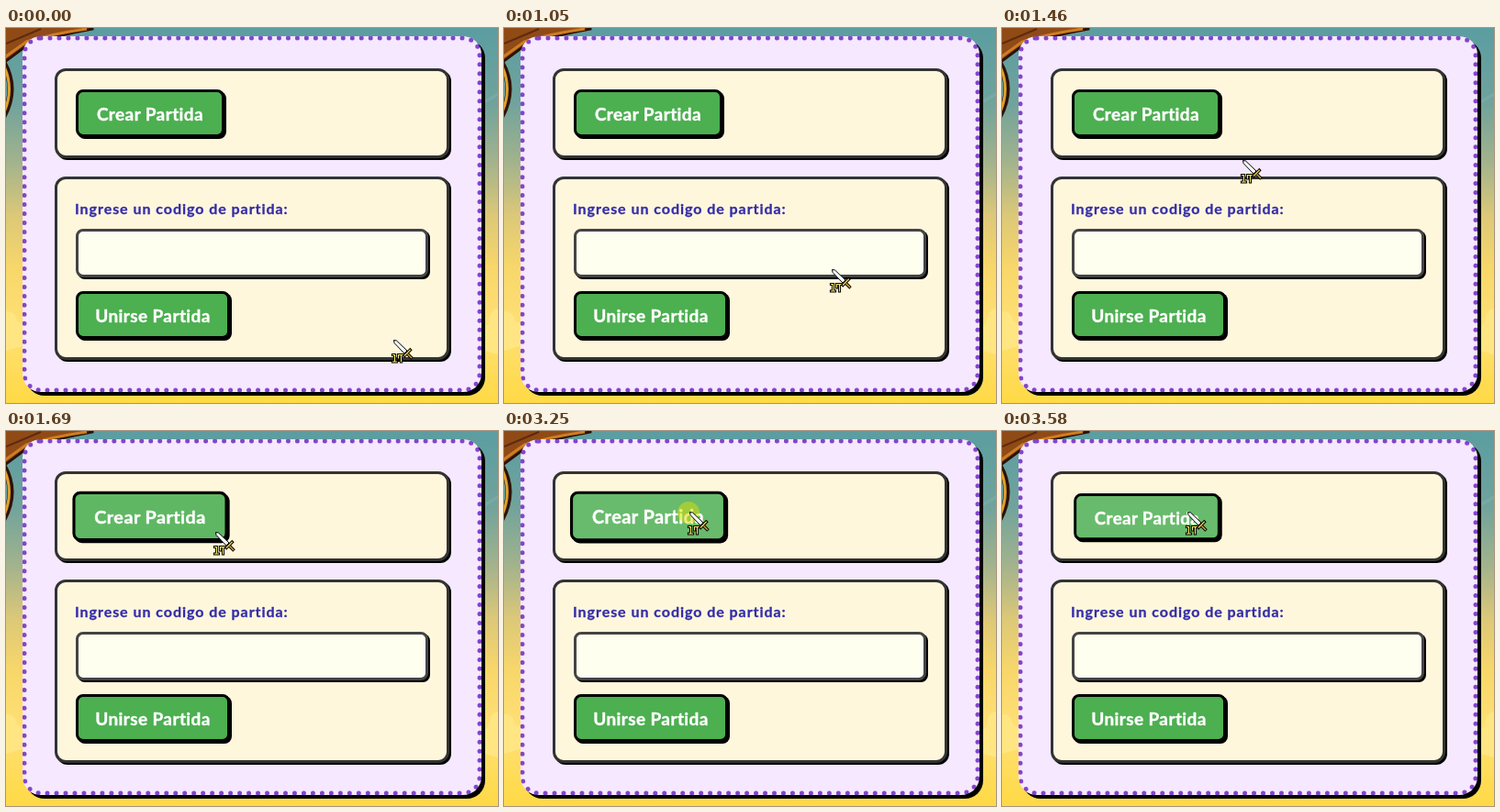
Recreate the animation shown at these times as an HTML page. Size 536 px wide and 409 px high, loop 3610 ms.

```html
<!DOCTYPE html>
<html lang="es">
<head>
<meta charset="utf-8">
<title>Partida</title>
<style>
  html, body { margin: 0; width: 100%; height: 100%; overflow: hidden; }
  body { position: relative; font-family: Lato, "Open Sans", sans-serif; font-weight: 700; }
  body > * { position: absolute; box-sizing: border-box; }
  #sky { left: 0; top: 0; }
  .panel {
    left: 18px; top: 9px; width: 500px; height: 388px;
    background: #f5e8ff; border: 5px dotted #8445cc; border-radius: 20px;
    box-shadow: 4px 4px 0 #000;
  }
  .card {
    left: 53px; width: 430px;
    background: #fff7dc; border: 3px solid #333; border-radius: 12px;
    box-shadow: 2px 2px 0 #000;
  }
  .field {
    left: 76px; top: 219px; width: 384px; height: 53px;
    background: #fffff0; border: 3px solid #444; border-radius: 8px;
    box-shadow: 2px 2px 0 #000;
  }
  .label {
    left: 75px; top: 187px; line-height: 20px; white-space: nowrap;
    font-size: 16px; letter-spacing: .95px; color: #332ca8;
    -webkit-text-stroke: .3px #332ca8;
  }
  .button {
    left: 76px; height: 52px; padding: 0;
    display: flex; align-items: center; justify-content: center; white-space: nowrap;
    font-size: 19px; letter-spacing: .4px; color: #fff;
    -webkit-text-stroke: .4px #fff;
    background: #4caf50; border: 3px solid #000; border-radius: 8px;
    box-shadow: 2px 2px 0 #000;
  }
  #halo {
    left: 189px; top: 77px; width: 24px; height: 24px;
    border-radius: 50%; background: rgba(216, 220, 10, .52);
  }
  #cursor { left: 0; top: 0; width: 30px; height: 32px; overflow: visible; }
</style>
</head>
<body>
<svg id="sky" width="536" height="409" viewBox="0 0 536 409">
  <defs>
    <linearGradient id="dusk" x1="0" y1="0" x2="0" y2="1">
      <stop offset="0" stop-color="#5b9da1"/>
      <stop offset=".2" stop-color="#70a39c"/>
      <stop offset=".36" stop-color="#a3b38c"/>
      <stop offset=".5" stop-color="#dcc878"/>
      <stop offset=".64" stop-color="#f8d76a"/>
      <stop offset=".8" stop-color="#ffe075"/>
      <stop offset="1" stop-color="#ffd945"/>
    </linearGradient>
  </defs>
  <rect width="536" height="409" fill="url(#dusk)"/>
  <path d="M516 82L536 70V74L516 86Z" fill="#78aaa5"/>
  <path d="M0 309Q10 308 12 320Q22 322 24 345L0 352Z" fill="#ffe682"/>
  <path d="M536 306Q526 308 526 322Q514 330 514 350L536 356Z" fill="#ffe682"/>
  <path d="M-4 36Q14 66 -4 98" fill="none" stroke="#2b1208" stroke-width="7"/>
  <path d="M-4 38Q11 66 -4 96" fill="none" stroke="#e0a02c" stroke-width="3"/>
  <path d="M-3 -3H94V1Q55 8 24 18L-3 38Z" fill="#8f4a16" stroke="#2b1208" stroke-width="3"/>
  <path d="M88 1Q52 6 22 15L-3 33" fill="none" stroke="#cf7d22" stroke-width="3"/>
  <path d="M0 17L38 1" fill="none" stroke="#5d2a0e" stroke-width="2"/>
</svg>

<div class="panel"></div>
<div class="card" style="top:44px;height:98px"></div>
<div class="card" style="top:162px;height:200px"></div>
<div class="label">Ingrese un codigo de partida:</div>
<div class="field"></div>
<div class="button" id="create" style="top:67px;width:162px">Crear Partida</div>
<div class="button" style="top:287px;width:168px">Unirse Partida</div>
<div id="halo"></div>

<svg id="cursor" viewBox="0 0 30 32">
  <g stroke="#000" stroke-width="3.4">
    <path d="M13 13L20.5 20.5"/>
    <path d="M11 18.5L19.5 10"/>
  </g>
  <path d="M.5 .5L3.5 1L15 12L12 15L1 3.5Z" fill="#f4f8f8" stroke="#000" stroke-width="1"/>
  <path d="M11.8 17.7L18.7 10.8" stroke="#f0cf48" stroke-width="1.4"/>
  <path d="M15.5 15.5L20 20" stroke="#d9a53a" stroke-width="1.4"/>
  <g fill="none" stroke-linecap="square">
    <path d="M-.5 16.5H1.5V24M-.5 24H3.5M5.5 20V16.5H10M8.5 17V24" stroke="#000" stroke-width="3.2"/>
    <path d="M-.5 16.5H1.5V24M-.5 24H3.5M5.5 20V16.5H10M8.5 17V24" stroke="#f6e76a" stroke-width="1.2"/>
  </g>
</svg>

<script>
const LOOP = 3610;
const $ = id => document.getElementById(id);
const create = $('create'), halo = $('halo'), cursor = $('cursor');

// [time, x, y] of the sword tip
const route = [
  [788, 422, 340], [820, 419, 337], [1050, 357, 263], [1340, 290, 175],
  [1460, 262, 144], [1690, 228, 110], [1870, 206, 91], [1900, 202, 88]
];

const clamp = v => Math.min(1, Math.max(0, v));
const mix = (a, b, k) => a + (b - a) * k;

// CSS "ease": cubic-bezier(.25, .1, .25, 1)
function ease(x) {
  x = clamp(x);
  const bez = (s, a, b) => 3 * (1 - s) ** 2 * s * a + 3 * (1 - s) * s * s * b + s ** 3;
  let lo = 0, hi = 1;
  for (let i = 0; i < 20; i++) {
    const mid = (lo + hi) / 2;
    if (bez(mid, .25, .25) < x) lo = mid; else hi = mid;
  }
  return bez(lo, .1, 1);
}

function pointAt(t) {
  if (t < 820) return route[0].slice(1);
  const i = route.findIndex(p => p[0] > t);
  if (i < 0) return route[route.length - 1].slice(1);
  const a = route[i - 1], b = route[i];
  const k = (t - a[0]) / (b[0] - a[0]);
  return [Math.round(mix(a[1], b[1], k)), Math.round(mix(a[2], b[2], k))];
}

function draw(t) {
  const [x, y] = pointAt(t);
  cursor.style.transform = `translate(${x}px, ${y}px)`;

  const grow = ease((t - 1570) / 200);
  const glow = ease((t - 1570) / 300);
  const press = ease((t - 3280) / 300);
  const scale = mix(mix(1, 1.05, grow), .985, press);
  create.style.transform = scale === 1 ? 'none'
    : `translate(${press}px, ${press * .7}px) scale(${scale})`;
  const tone = [[76, 104], [175, 187], [80, 108]].map(([a, b]) => Math.round(mix(a, b, glow)));
  create.style.backgroundColor = `rgb(${tone})`;

  halo.style.visibility = t >= 3250 && t < 3380 ? 'visible' : 'hidden';
}

function tick() {
  draw(performance.now() % LOOP);
  requestAnimationFrame(tick);
}
tick();
</script>
</body>
</html>
```
